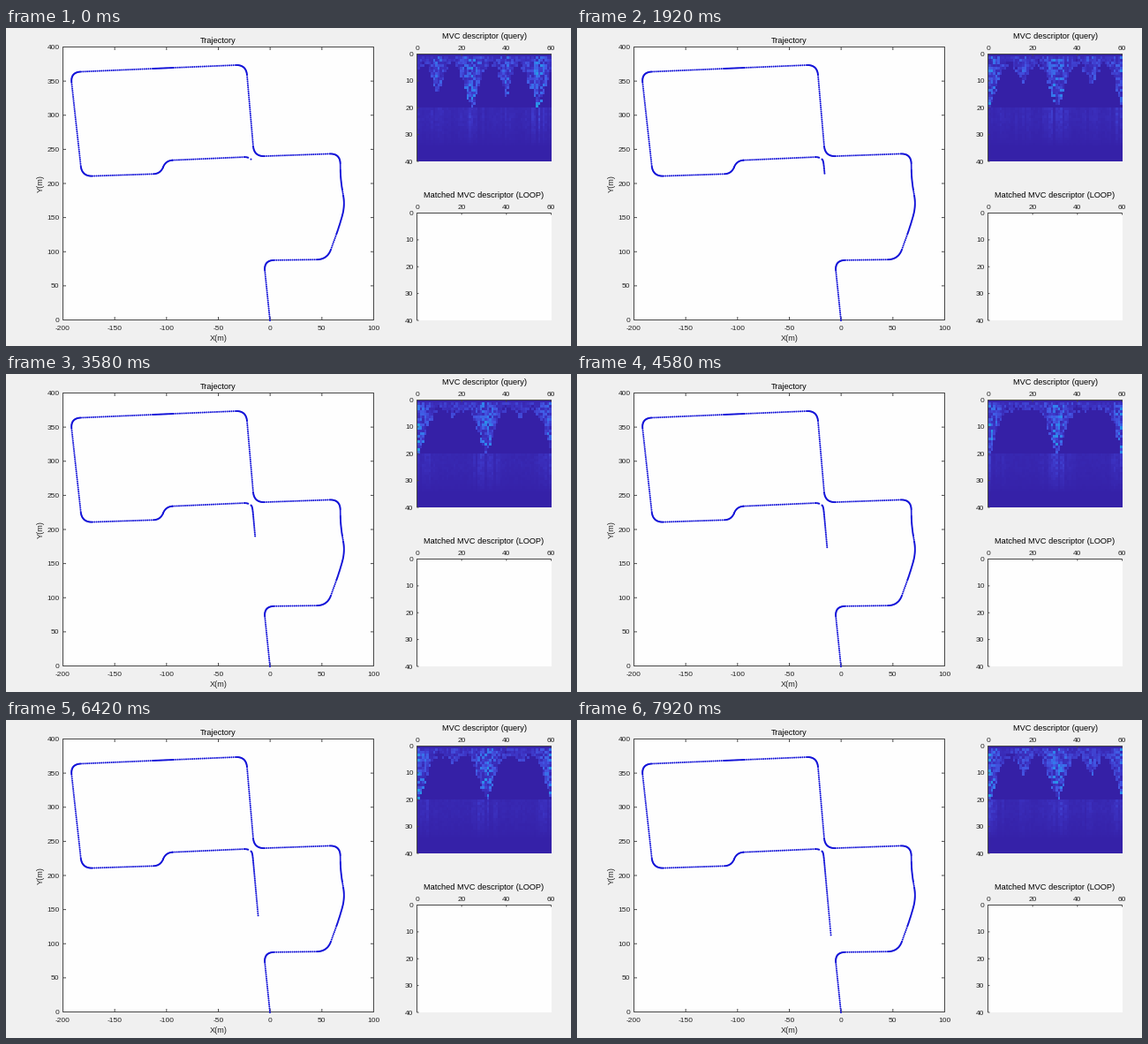
Animation, 640 px wide and 360 px high, one loop 8 s. Source, as a matplotlib script:

```python
import numpy as np
import matplotlib.pyplot as plt
from matplotlib.animation import FuncAnimation
from matplotlib.colors import LinearSegmentedColormap
from matplotlib.patches import Rectangle

W, H, DPI = 640, 360, 80
PT = 72 / DPI                      # points per pixel
FRAMES, LOOP_MS = 96, 8000
UPDATES = FRAMES // 2
INK, PAPER, PLOT_BG, DOT = "#484848", "#f0f0f0", "#fefefe", "#1212d8"
PARULA = LinearSegmentedColormap.from_list(
    "parula_like",
    ["#3520a6", "#3d34c4", "#4358e4", "#2f86ee", "#1fb0d8", "#3cc899"])

plt.rcParams["font.family"] = "Liberation Sans"
fig = plt.figure(figsize=(W / DPI, H / DPI), dpi=DPI, facecolor=PAPER)
ax = fig.add_axes([0, 0, 1, 1])
ax.axis("off")


def label(x, y, text, size=8.4, ha="center", color="#262626"):
    """Text vertically centred on y."""
    ax.text(x, y + 0.3 * size, text, fontsize=size * PT, ha=ha,
            va="baseline", color=color)


def line(x0, y0, x1, y1):
    ax.plot([x0, x1], [y0, y1], color=INK, lw=PT, snap=False,
            solid_capstyle="butt", zorder=4)


def panel(x0, y0, x1, y1):
    ax.add_patch(Rectangle((x0, y0), x1 - x0, y1 - y0, fc=PLOT_BG, ec="none"))


def trajectory_axes(x0=64.5, y0=21.5, x1=416.5, y1=330.5):
    panel(x0, y0, x1, y1)
    for y in (y0, y1):
        line(x0, y, x1, y)
    for x in (x0, x1):
        line(x, y0, x, y1)
    for v in range(-200, 101, 50):
        x = x0 + (v + 200) / 300 * (x1 - x0)
        line(x, y1, x, y1 - 3.5)
        line(x, y0, x, y0 + 3.5)
        label(x, y1 + 8.8, str(v))
    for v in range(0, 401, 50):
        y = y1 - v / 400 * (y1 - y0)
        line(x0, y, x0 + 3.5, y)
        line(x1, y, x1 - 3.5, y)
        label(x0 - 4, y, str(v), ha="right")
    label(240.5, 14.4, "Trajectory", 9.2, color="black")
    label(240.5, 351, "X(m)", 9.2)
    ax.text(39, 176, "Y(m)", fontsize=9.2 * PT, rotation=90,
            ha="center", va="center", color="#262626")


def descriptor_axes(y0, title, x0=465.5, x1=617.5, height=121.5):
    y1 = y0 + height
    panel(x0, y0, x1, y1)
    line(x0, y0, x1, y0)
    line(x0, y0, x0, y1)
    for v in range(0, 61, 20):
        x = x0 + v / 60 * (x1 - x0)
        line(x, y0, x, y0 + 2)
        label(x, y0 - 7.2, str(v))
    for v in range(0, 41, 10):
        y = y0 + v / 40 * height
        line(x0, y, x0 + 2, y)
        label(x0 - 4, y, str(v), ha="right")
    label((x0 + x1) / 2, y0 - 20.3, title, 9.3, color="black")


def straight(a, b, step=2.3):
    n = max(1, round(abs(b - a) / step))
    return a + (b - a) * np.arange(n) / n


def rounded_route(corners, radius=12, step=1.2):
    """Dots along a polyline, closer together on its rounded corners."""
    parts, last = [], corners[0]
    for before, p, after in zip(corners, corners[1:], corners[2:]):
        r = min(radius, abs(p - before) / 2, abs(after - p) / 2)
        a = p + (before - p) / abs(before - p) * r
        b = p + (after - p) / abs(after - p) * r
        t = np.arange(0, 1, step / (2 * r))
        parts += [straight(last, a),
                  (1 - t)**2 * a + 2 * t * (1 - t) * p + t**2 * b]
        last = b
    return np.concatenate(parts + [straight(last, corners[-1])])


# Corners in pixels, as x + yj
ROUTE = rounded_route(np.array([
    299 + 331j, 292 + 263j, 364 + 262j, 378 + 223j, 384 + 201j, 379 + 172j,
    378.5 + 142j, 281 + 145.5j, 272 + 41.5j, 178 + 45.5j, 73 + 50j,
    86 + 168j, 175 + 165j, 181 + 150j, 272 + 146j, 276.5 + 147.5j]))

# One new dot per update, gathering speed out of the turn
u = np.arange(UPDATES + 1) / UPDATES
run = u**1.28
HEAD = 279 + 8.6 * run - 1.5 * np.exp(-24 * u) + 1j * (148.6 + 94.8 * run)
TRACK = np.concatenate([ROUTE, HEAD])
TRACK = np.c_[TRACK.real, TRACK.imag]

COLS, ROWS = np.arange(60), np.arange(40)[:, None]
GRAIN = np.random.default_rng(7).random((40, 60))


def pillar_depth(k):
    """Rows reached by four pillars spaced evenly around the panorama."""
    turn = -6.5 * np.exp(-k / 2)
    minor = np.cos(np.pi * k / 60)**2
    depth = np.zeros(60)
    for j in range(4):
        reach, half_width = (13 * minor, 6) if j % 2 else (18, 9)
        gap = abs((COLS - 15.2 * j - turn + 30) % 60 - 30)
        depth = np.maximum(depth, reach * np.clip(1 - gap / half_width, 0, 1)**1.6)
    return depth


def descriptor(k):
    depth = pillar_depth(k)
    rng = np.random.default_rng(100 + k)
    grain = np.where(rng.random((40, 60)) < 0.5, GRAIN, rng.random((40, 60)))
    lit = ROWS < 3 + depth + (grain - 0.5) * 3
    img = np.where(lit, 0.1 + (0.2 + 0.025 * depth) * grain**1.5, 0)
    img[0] = 0.04

    # Striped haze beneath the arches
    soft = np.convolve(np.pad(depth, 3, mode="wrap"), np.ones(7) / 7, "valid")
    stripes = 0.06 + 0.02 * soft * rng.random(60)
    fade = np.clip((34 - ROWS) / 10, 0, 1)
    haze = 0.02 + fade * stripes * (0.5 + 0.5 * grain)
    return np.where(ROWS < 20, img, haze)


trajectory_axes()
descriptor_axes(29.5, "MVC descriptor (query)")
descriptor_axes(209.5, "Matched MVC descriptor (LOOP)")
heat = ax.imshow(descriptor(0), cmap=PARULA, vmin=0, vmax=1, aspect="auto",
                 extent=(465.5, 617.5, 151, 29.5), interpolation="nearest",
                 zorder=2)
dots = ax.scatter(*TRACK.T, s=np.full(len(TRACK), (2 * PT)**2), color=DOT,
                  linewidths=0, snap=False, zorder=5)
ax.set_xlim(0, W)
ax.set_ylim(H, 0)


def update(i):
    k = i // 2 + 1 if i else 0
    dots.set_offsets(TRACK[:len(ROUTE) + k + 1])
    heat.set_data(descriptor(k))
    return dots, heat


anim = FuncAnimation(fig, update, frames=FRAMES, interval=LOOP_MS / FRAMES,
                     repeat=True, repeat_delay=0)
plt.show()
```
